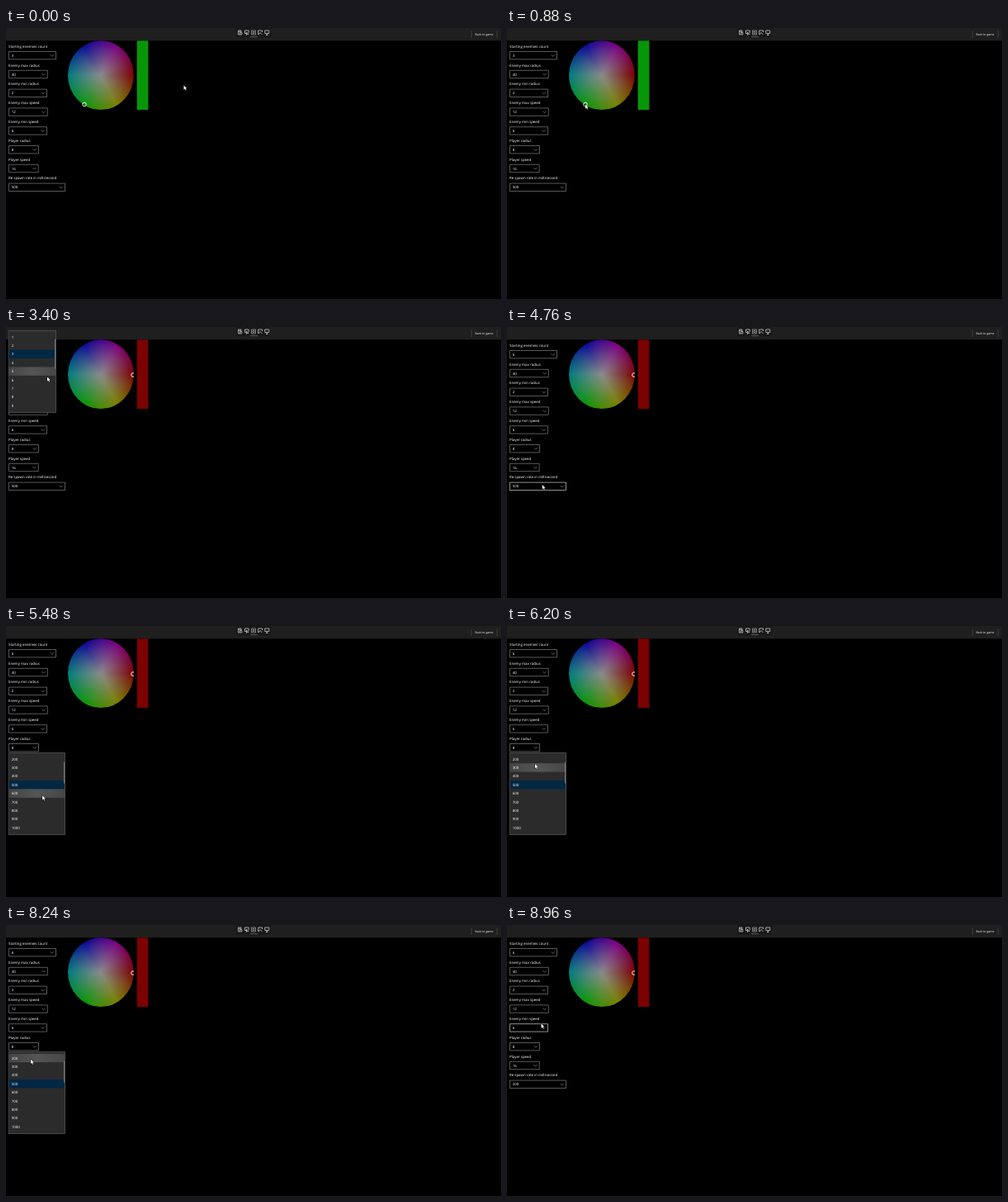
Recreate the animation shown at these times as an HTML page with a canvas. Size 600 by 328 pixels, loop 9 s.

```html
<!DOCTYPE html>
<html lang="en">
<head>
<meta charset="utf-8">
<style>
  html, body { margin: 0; height: 100%; overflow: hidden; background: #000; }
  canvas { display: block; }
</style>
</head>
<body>
<canvas id="stage" width="600" height="328"></canvas>
<script>
const ctx = document.getElementById('stage').getContext('2d');
const LOOP = 9000, ROW = 10.4;
const WHEEL = { x: 114.9, y: 57.2, rx: 39.9, ry: 41.9 };
const DRAG_START = 880, DRAG_END = 1480;

// Rim colours clockwise from the right
const HUES = [[122, 0, 0], [122, 128, 0], [8, 150, 8], [0, 125, 125], [8, 8, 150], [122, 0, 128]];

// Label, default value, right edge
const FIELDS = [
  ['Starting enemies count', 3, 60.5],
  ['Enemy max radius', 40, 50.3],
  ['Enemy min radius', 2, 49.5],
  ['Enemy max speed', 12, 50.3],
  ['Enemy min speed', 6, 49.5],
  ['Player radius', 8, 39.5],
  ['Player speed', 16, 39.2],
  ['Re spawn rate in millisecond', 500, 71.5]
];

const LISTS = [
  { field: 0, open: 2920, close: 3560, top: 4.5, step: 1, first: 1, selected: 2, picked: 6, thumb: [10, 46] },
  { field: 7, open: 4920, close: 8300, top: 153.5, step: 100, first: 200, selected: 3, picked: 200, thumb: [11, 37] }
];

// Pointer path: time, x, y
const PATH = [
  [0, 215.5, 69.5], [760, 95, 92.5], [920, 95, 92.5], [1130, 128, 91], [1300, 150, 74],
  [1480, 176, 58.5], [2040, 174, 58.7], [2080, 174, 58.7], [2720, 52, 33], [3080, 52, 33],
  [3300, 50, 54], [3400, 50, 60.5], [3480, 50, 64], [3900, 50, 64], [4760, 42.8, 191],
  [5200, 42.8, 191], [5700, 45, 215], [6200, 34, 167], [6700, 33, 171], [7480, 29.5, 163.5],
  [8200, 30, 163], [8560, 33, 155], [8960, 41.5, 119.5], [9000, 41.5, 119.5]
];

const clamp = v => Math.min(1, Math.max(0, v));
const mix = (a, b, k) => a + (b - a) * k;
const rgb = c => `rgb(${c.map(Math.round)})`;

function pointerAt(t) {
  const i = Math.max(1, PATH.findIndex(p => p[0] >= t));
  const a = PATH[i - 1], b = PATH[i];
  const k = clamp((t - a[0]) / (b[0] - a[0])), e = k * k * (3 - 2 * k);
  return { x: mix(a[1], b[1], e), y: mix(a[2], b[2], e) };
}

function rect(x, y, w, h, color) {
  ctx.fillStyle = color;
  ctx.fillRect(x, y, w, h);
}

// y is the middle of the capitals
function text(str, x, y, size = 4.4) {
  ctx.font = `${size}px "Open Sans", sans-serif`;
  ctx.fillStyle = '#fff';
  ctx.fillText(str, x, y + size * 0.36);
}

function line(d, color = '#ddd', width = 0.7) {
  ctx.strokeStyle = color;
  ctx.lineWidth = width;
  ctx.stroke(new Path2D(d));
}

function drawToolbar() {
  rect(0, 0, 600, 15.3, '#1f1f1f');
  rect(279, 0, 42, 11.5, '#191919');
  line('M283 8h-1.500v-5h3.500v2M282 4.300h2.500M283.500 5.500h2.300v2.500h-2.300z');
  line('M291.500 6.500h-2v-3.500h4.700v3M291.500 5v3.500l1-1h1.500z');
  line('M297.500 3h5v5h-5z', '#aaa');
  line('M299 4.500h2v2h-2z', '#aaa');
  line('M305.700 8v-5h4.800v2M306 8l2-2.500l2.500 2.500');
  line('M313.800 3h5v3.500h-5zM316.300 6.500v2M315 8.500h2.500');
  line('M296 10.700h9', '#777');
  line('M564.200 3.500v8.500M595.200 3.500v8.500', '#555', 0.6);
  text('Back to game', 568.5, 7.9, 3.5);
}

function drawPicker(t) {
  const { x, y, rx, ry } = WHEEL;
  const p = t < DRAG_START ? PATH[1] : null;
  const c = p ? { x: p[1], y: p[2] } : pointerAt(Math.min(t, DRAG_END));
  const dx = (c.x - x) / rx, dy = (c.y - y) / ry;
  const angle = Math.atan2(dy, dx), sat = Math.min(0.98, Math.hypot(dx, dy));

  ctx.save();
  ctx.translate(x, y);
  ctx.scale(1, ry / rx);
  const hue = ctx.createConicGradient(0, 0, 0);
  for (let i = 0; i <= 6; i++) hue.addColorStop(i / 6, rgb(HUES[i % 6]));
  const grey = ctx.createRadialGradient(0, 0, 0, 0, 0, rx);
  grey.addColorStop(0, 'rgba(138,138,138,1)');
  grey.addColorStop(1, 'rgba(138,138,138,0)');
  ctx.beginPath();
  ctx.arc(0, 0, rx, 0, 7);
  for (const fill of [hue, grey]) {
    ctx.fillStyle = fill;
    ctx.fill();
  }
  ctx.restore();

  ctx.save();
  ctx.beginPath();
  ctx.rect(75, 15.5, 80, 83.6);
  ctx.clip();
  ctx.beginPath();
  ctx.arc(x + Math.cos(angle) * sat * rx, y + Math.sin(angle) * sat * ry, 2.3, 0, 7);
  ctx.strokeStyle = '#fff';
  ctx.lineWidth = 0.9;
  ctx.stroke();
  ctx.restore();

  const turn = ((angle / Math.PI * 3) + 6) % 6, i = Math.floor(turn);
  const color = HUES[i].map((v, n) => mix(v, HUES[(i + 1) % 6][n], turn - i));
  rect(158.7, 15.4, 13.7, 83.6, rgb(color));
}

function drawFields(t, hover, listOpen) {
  FIELDS.forEach(([label, initial, right], i) => {
    const y = 22.3 + i * 22.8, top = y + 6.2, mid = y + 10.9;
    const list = LISTS.find(l => l.field === i);
    const value = list && t >= list.close ? list.picked : initial;
    const over = !listOpen && hover.x > 3 && hover.x < right && hover.y > top - 0.5 && hover.y < top + 10;
    text(label, 3, y);
    line(`M3.400 ${top}H${right}v9.400H3.400z`, over ? '#ddd' : '#888', 0.65);
    text(value, 6.8, mid);
    line(`M${right - 6.8} ${mid - 0.9}l2 2l2-2`, '#bbb', 0.5);
  });
}

function drawList(list, t, hover) {
  const right = FIELDS[list.field][2], width = right - 3;
  const k = 1 - (1 - clamp((t - list.open) / 220)) ** 3;
  const rowTop = i => list.top + 2.3 + i * ROW;
  const top = mix(rowTop(list.selected), list.top, k);
  const bottom = mix(rowTop(list.selected + 1), list.top + 99, k);

  ctx.save();
  ctx.beginPath();
  ctx.rect(2.5, top - 0.5, width + 1, bottom - top + 1);
  ctx.clip();
  rect(3, top, width, bottom - top, '#2b2b2b');
  for (let i = 0; i < 9; i++) {
    const y = rowTop(i);
    const over = hover.x > 3 && hover.x < right && hover.y >= y && hover.y < y + ROW;
    if (i === list.selected) rect(3.5, y, width - 1, ROW, over ? '#003a63' : '#002744');
    else if (over) {
      const glow = ctx.createLinearGradient(3, 0, right, 0);
      glow.addColorStop(0, '#444');
      glow.addColorStop(0.5, '#555');
      glow.addColorStop(1, '#464646');
      rect(3.5, y, width - 1, ROW, glow);
    }
    text(list.first + i * list.step, 6.8, y + 5.3);
  }
  rect(right - 1.3, list.top + list.thumb[0], 0.9, list.thumb[1] - list.thumb[0], '#8a8a8a');
  line(`M3 ${top}H${right}V${bottom}H3z`, '#555', 0.8);
  ctx.restore();
}

function drawPointer({ x, y }) {
  const arrow = new Path2D(`M${x} ${y}v5.200l1.200-1.100l.9 2l.9-.4l-.9-1.900h1.700z`);
  ctx.strokeStyle = '#000';
  ctx.lineWidth = 0.8;
  ctx.stroke(arrow);
  ctx.fillStyle = '#fff';
  ctx.fill(arrow);
}

function draw(now) {
  const t = now % LOOP;
  const hover = pointerAt(Math.max(0, t - 60)); // highlights trail the pointer slightly
  const list = LISTS.find(l => t >= l.open && t < l.close);
  ctx.textRendering = 'geometricPrecision';
  rect(0, 0, 600, 328, '#000');
  drawToolbar();
  drawPicker(t);
  drawFields(t, hover, Boolean(list));
  if (list) drawList(list, t, hover);
  drawPointer(pointerAt(t));
}

const start = performance.now();
function tick() {
  draw(performance.now() - start);
  requestAnimationFrame(tick);
}
tick();
</script>
</body>
</html>
```
